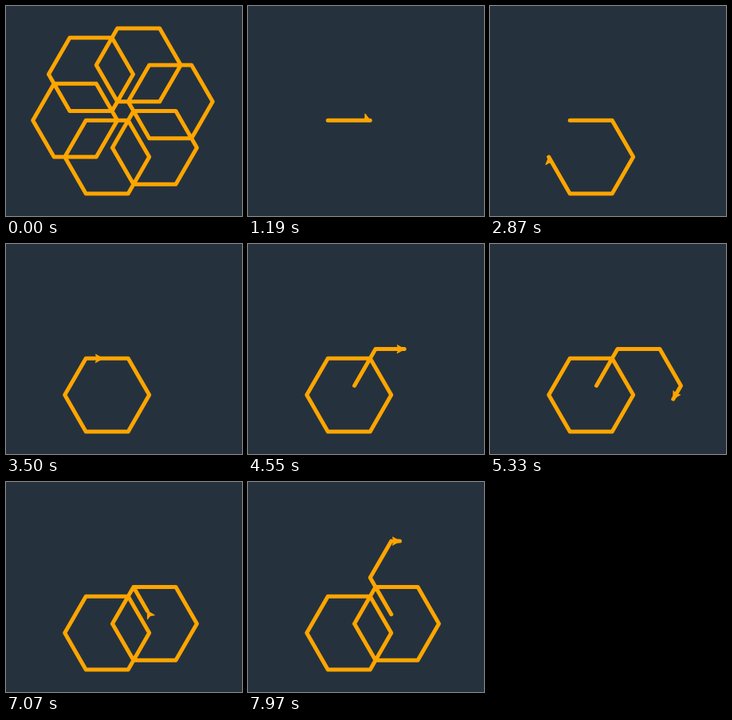
Write an HTML page with a canvas that moves like this. It is 296x263 px and loops after 8 s.

```html
<!DOCTYPE html>
<html lang="en">
<head>
<meta charset="utf-8">
<title>Hexagon rosette</title>
<style>
  html, body { margin: 0; width: 100%; height: 100%; overflow: hidden; background: #25323d; }
  canvas { display: block; width: 296px; height: 263px; }
</style>
</head>
<body>
<canvas id="stage"></canvas>
<script>
const W = 296, H = 263, LOOP = 8000, HOLD = 500, TICK = 30;
const SIDE = 53, BACK = 39.5, COLOR = '#ffa500';
// A pen hop covers about 3.1 px, a turn 60 degrees in 21 ticks plus one at rest.
const SIDE_STEPS = 17, BACK_STEPS = 13, TURN_STEPS = 22;
// Time in ms against turtle steps done.
const PACE = [[542, 0], [1190, 60], [2270, 158.8], [3500, 275.8], [4550, 371.6], [6140, 519.6], [8000, 691.2]];

const canvas = document.getElementById('stage');
const ratio = window.devicePixelRatio || 1;
canvas.width = W * ratio;
canvas.height = H * ratio;
const ctx = canvas.getContext('2d');
ctx.scale(ratio, ratio);

const move = (dist, steps) => ({ dist, turn: 0, steps });
const turn = deg => ({ dist: 0, turn: deg, steps: TURN_STEPS });

const program = [];
for (let round = 0; round < 6; round++) {
  program.push(turn(60), move(-BACK, BACK_STEPS));
  for (let i = 0; i < 6; i++) program.push(move(SIDE, SIDE_STEPS), turn(-60));
  program.push(move(SIDE, SIDE_STEPS));
}

function stepsAt(t) {
  if (t <= PACE[0][0]) return 0;
  const i = PACE.findIndex(p => t <= p[0]);
  const [t0, n0] = PACE[i - 1], [t1, n1] = PACE[i];
  return n0 + (n1 - n0) * (t - t0) / (t1 - t0);
}

function drawArrow(x, y, angle) {
  ctx.save();
  ctx.translate(x, y);
  ctx.rotate(angle);
  ctx.beginPath();
  ctx.moveTo(0, 0);
  ctx.lineTo(-9, -5);
  ctx.lineTo(-7, 0);
  ctx.lineTo(-9, 5);
  ctx.closePath();
  ctx.lineWidth = 1;
  ctx.fill();
  ctx.stroke();
  ctx.restore();
}

function draw(steps) {
  let x = 100.2 + BACK, y = 143.2, heading = -60, left = steps;
  const angle = () => -heading * Math.PI / 180;

  ctx.fillStyle = '#25323d';
  ctx.fillRect(0, 0, W, H);
  ctx.fillStyle = ctx.strokeStyle = COLOR;
  ctx.lineCap = ctx.lineJoin = 'round';
  ctx.lineWidth = 5;
  ctx.beginPath();
  ctx.moveTo(x, y);
  for (const op of program) {
    if (left <= 0) break;
    const part = Math.min(1, left / op.steps);
    if (op.dist) {
      x += op.dist * part * Math.cos(angle());
      y += op.dist * part * Math.sin(angle());
      ctx.lineTo(x, y);
    } else {
      heading += op.turn * Math.min(1, left / (op.steps - 1));
    }
    left -= op.steps;
  }
  ctx.stroke();
  if (steps < Infinity) drawArrow(x, y, angle());
}

function frame() {
  const t = performance.now() % LOOP;
  draw(t < HOLD ? Infinity : stepsAt(HOLD + Math.floor((t - HOLD) / TICK) * TICK));
  requestAnimationFrame(frame);
}
frame();
</script>
</body>
</html>
```
